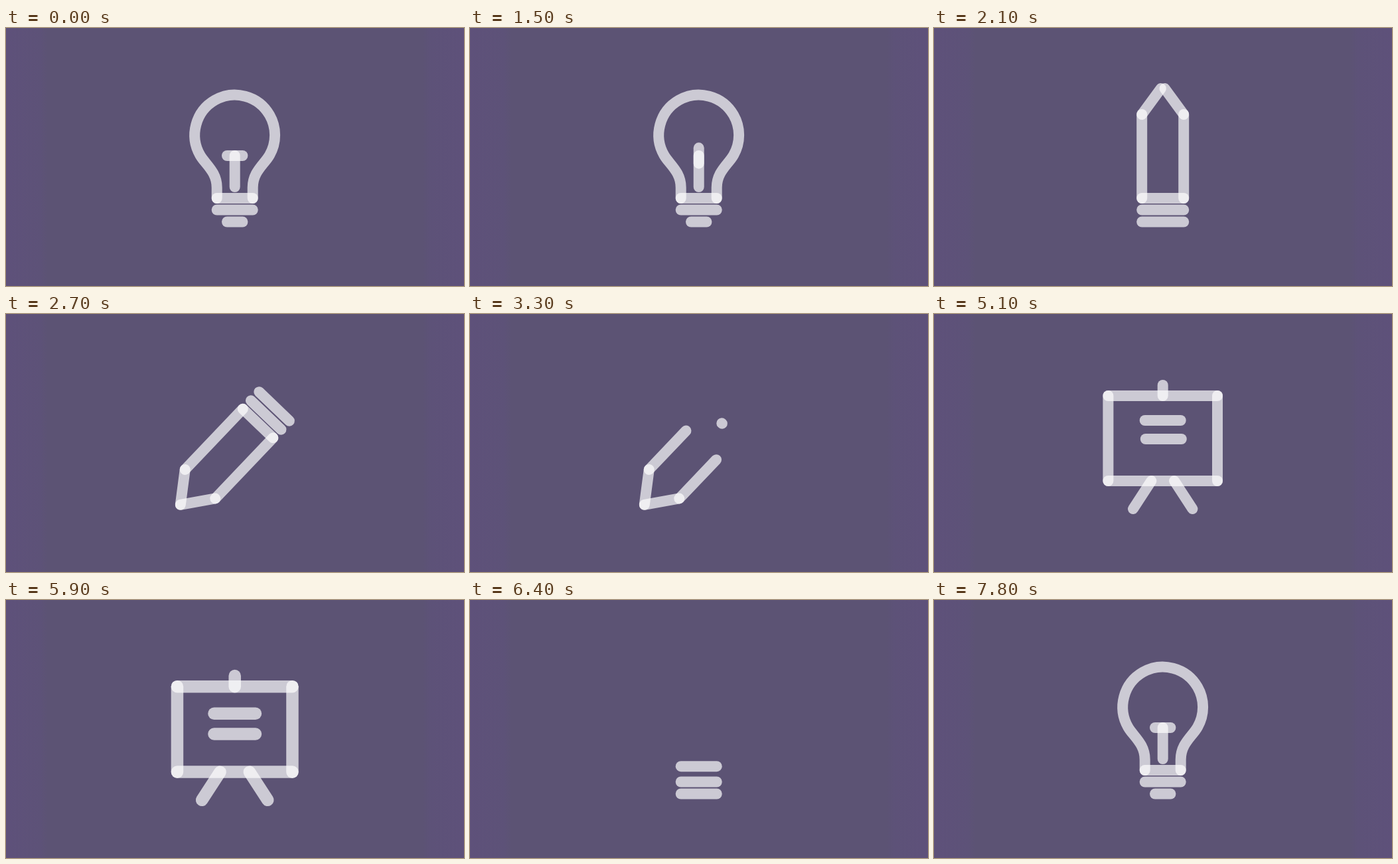
Write an HTML page with a canvas that moves like this. It is 690 px wide and 388 px high and loops after 7.9 s.

```html
<!DOCTYPE html>
<html lang="en">
<head>
<meta charset="utf-8">
<title>Morphing icons</title>
<style>
html, body { margin: 0; width: 100%; height: 100%; overflow: hidden; background: #5c5375; }
canvas { display: block; width: 690px; height: 388px; }
</style>
</head>
<body>
<canvas id="stage" width="690" height="388"></canvas>
<script>
const ctx = document.getElementById('stage').getContext('2d');
const LOOP = 7900, CX = 344.7;

const easeOut = p => 1 - (1 - p) ** 3;
const easeIn = p => p ** 3;
const easeBoth = p => p < 0.5 ? 4 * p ** 3 : 1 - (2 - 2 * p) ** 3 / 2;
const mix = (a, b, k) => a + (b - a) * k;

// Eased progress of t through the span a..b
function span(t, a, b, ease = easeBoth) {
  return ease(Math.min(1, Math.max(0, (t - a) / (b - a))));
}

function line(x1, y1, x2, y2) {
  ctx.beginPath();
  ctx.moveTo(x1, y1);
  ctx.lineTo(x2, y2);
  ctx.stroke();
}

// The part of a segment between the fractions from and to
function part(x1, y1, x2, y2, from, to) {
  if (to - from < 0.002) return;
  line(mix(x1, x2, from), mix(y1, y2, from), mix(x1, x2, to), mix(y1, y2, to));
}

function bar(y, half, x = CX) {
  line(x - half, y, x + half, y);
}

function backdrop() {
  const g = ctx.createLinearGradient(0, 0, 690, 0);
  g.addColorStop(0, '#5e517a');
  g.addColorStop(0.075, '#5d5278');
  g.addColorStop(0.09, '#5c5374');
  g.addColorStop(0.91, '#5c5374');
  g.addColorStop(0.925, '#5d5278');
  g.addColorStop(1, '#5e517a');
  ctx.fillStyle = g;
  ctx.fillRect(0, 0, 690, 388);
}

function glass(dy) {
  if (dy < -270) return;
  const y = 161 + dy, r = 60.4, a = Math.PI / 6;
  const dx = r * Math.cos(a), low = y + r * Math.sin(a);
  ctx.beginPath();
  ctx.moveTo(CX - 27, 256 + dy);
  ctx.lineTo(CX - 27, 240 + dy);
  ctx.bezierCurveTo(CX - 27, 216 + dy, CX - 44.5, 205 + dy, CX - dx, low);
  ctx.arc(CX, y, r, Math.PI - a, a);
  ctx.bezierCurveTo(CX + 44.5, 205 + dy, CX + 27, 216 + dy, CX + 27, 240 + dy);
  ctx.lineTo(CX + 27, 256 + dy);
  ctx.stroke();
}

// rise: 0 hidden, 1 full height; turn: 0 level, 1 upright
function filament(rise, turn) {
  if (rise < 0.01) return;
  const top = mix(239, 192, rise), a = turn * Math.PI / 2;
  const half = 11.7 * rise, dx = half * Math.cos(a), dy = half * Math.sin(a);
  line(CX, top, CX, 239);
  line(CX - dx, top - dy, CX + dx, top + dy);
}

function rays(t) {
  const grow = span(t, 280, 850, easeOut), fade = span(t, 850, 1300);
  if (grow <= 0 || fade >= 1) return;
  for (let i = -3; i <= 3; i++) {
    const a = i * 42 * Math.PI / 180, s = Math.sin(a), c = -Math.cos(a);
    const inner = mix(84, 108, fade), outer = mix(84, 108, grow);
    ctx.lineWidth = 16 * Math.min(1, grow * 2) * (1 - easeIn(fade));
    line(CX + inner * s, 161 + inner * c, CX + outer * s, 161 + outer * c);
  }
  ctx.lineWidth = 16;
}

function bulb(t) {
  rays(t);
  const out = span(t, 1500, 1950, easeIn);
  const turn = span(t, 1400, 1500);
  glass(-272 * out);
  filament(1 - span(t, 1500, 1850), turn);
}

function pencil(t) {
  const wide = span(t, 1600, 2000);
  const half = mix(27, 31.5, wide);
  const side = span(t, 1780, 2080, easeOut), tip = span(t, 1980, 2200, easeOut);
  const spin = span(t, 2180, 2700);
  // Vanishing runs from the eraser towards the tip
  const gone = [0, 1, 2, 3, 4].map(i => span(t, 2850 + i * 110, 3120 + i * 110));
  ctx.save();
  ctx.translate(343.8, 203.3);
  ctx.rotate(-136.3 * Math.PI / 180 * spin);
  ctx.translate(-343.8, -203.3);
  const rows = [[291.5, mix(11.7, half, wide), gone[0]], [273.5, half, gone[1]], [256, half, gone[2]]];
  for (const [y, h, g] of rows) if (g < 0.998) bar(y, h * (1 - g));
  for (const s of [-1, 1]) {
    const x = CX + s * 31.5;
    part(x, 256, x, 130, gone[3], side);
    part(x, 130, CX, 87, gone[4], tip);
  }
  ctx.restore();
}

function board(t) {
  const fold = span(t, 5760, 6200);
  const swell = 1 + 0.18 * span(t, 5530, 5740, easeOut) * (1 - fold);
  ctx.save();
  ctx.translate(CX, 202);
  ctx.scale(swell, swell);
  ctx.translate(-CX, -202);

  const base = span(t, 3380, 3620, easeOut);
  if (base > 0) bar(mix(251, 250.2, fold), mix(82.3 * base, 27, fold));

  const leg = 1.14 * span(t, 3740, 4060, easeOut) - 0.14 * span(t, 4120, 4420);
  const reach = leg * (1 - fold);
  if (reach > 0.01) {
    for (const s of [-1, 1]) {
      const x = CX + s * 31, dx = s * 13.7 * reach, dy = 21 * reach;
      const y = mix(272, 251, fold);
      line(x - dx, y - dy, x + dx, y + dy);
    }
  }

  const rise = span(t, 4110, 4300, easeOut) * (1 - fold);
  const width = mix(82.3, 27, fold);
  const top = mix(251, 123, rise);
  const cover = span(t, 4220, 4430, easeOut);
  const keep = 1 - fold;
  for (const s of [-1, 1]) part(CX + s * width, 251, CX + s * width, 123, 0, rise);
  if (keep > 0.01 && cover > 0) {
    part(CX - width, top, CX + width, top, 0.5 - cover / 2, 0.5 + cover / 2);
    part(CX, top, CX, top - 16 * keep, 0, span(t, 4360, 4520, easeOut));
  }

  const drop = span(t, 4750, 5050, easeOut);
  const slide = span(t, 4780, 5220, easeOut);
  if (drop > 0) bar(mix(mix(123, 160, drop), 273.5, fold), 27 * drop);
  if (slide > 0) {
    const half = 27 * Math.min(1, slide * 1.3);
    bar(mix(188, 291.5, fold), half, mix(427 - half, CX, slide));
  }
  ctx.restore();
}

function rebuild(t) {
  const narrow = span(t, 6480, 6900);
  bar(mix(250.2, 256, narrow), 27);
  bar(273.5, 27);
  bar(291.5, mix(27, 11.7, narrow));
  filament(span(t, 6560, 7080), 1 - span(t, 7350, 7720));
  glass(-272 * (1 - span(t, 7130, 7700, easeOut)));
}

function draw(t) {
  backdrop();
  ctx.strokeStyle = 'rgba(255,255,255,0.69)';
  ctx.lineWidth = 16;
  ctx.lineCap = 'round';
  ctx.lineJoin = 'round';
  if (t < 2000) bulb(t);
  if (t < 3700) pencil(t);
  if (t >= 3380 && t < 6350) board(t);
  if (t >= 6350) rebuild(t);
}

const start = performance.now();
function tick() {
  draw((performance.now() - start) % LOOP);
  requestAnimationFrame(tick);
}
tick();
</script>
</body>
</html>
```
